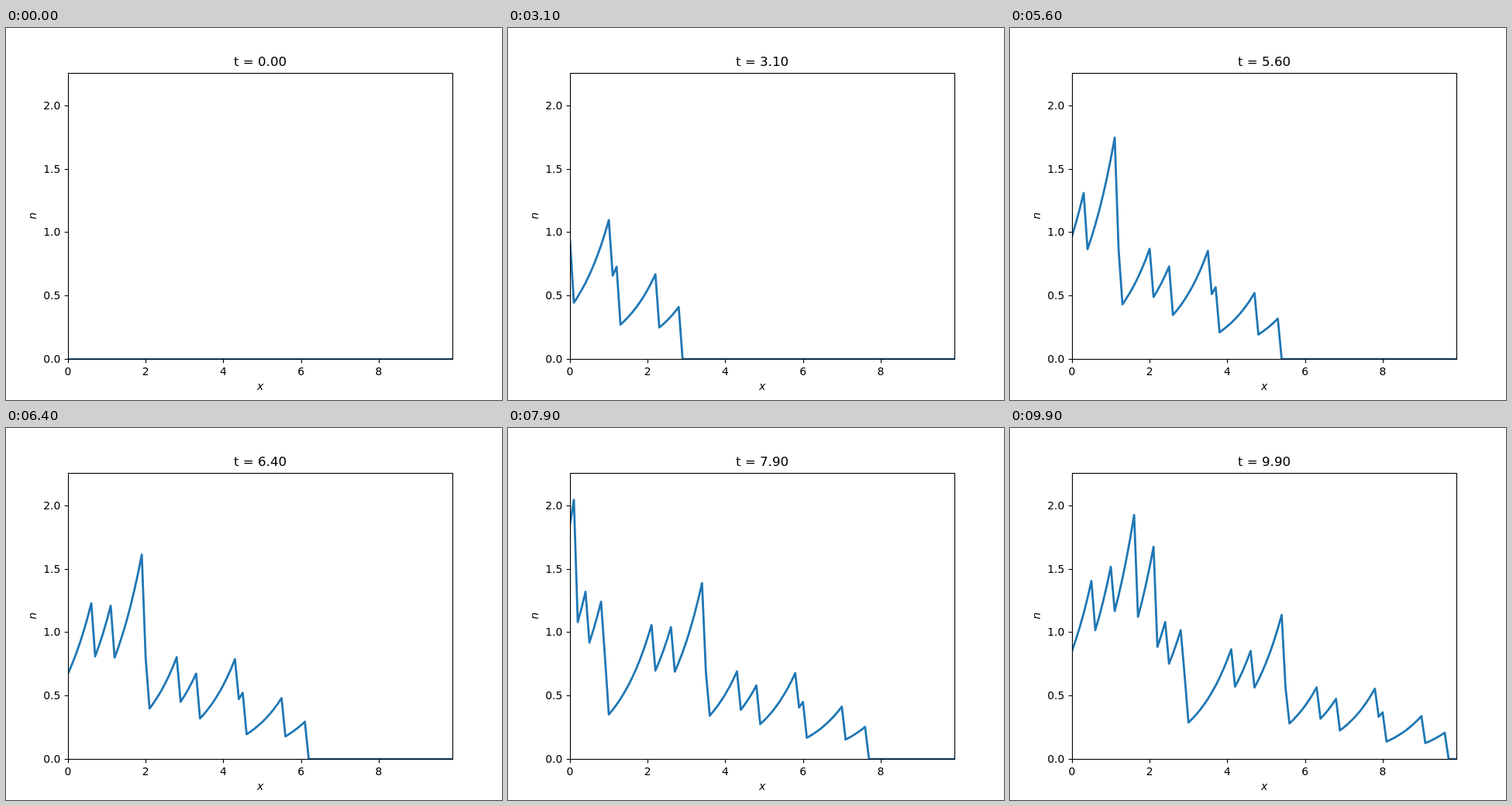
Animation of 640 by 480 pixels, one loop 10000 ms. Source, as an HTML page with a canvas:

```html
<!DOCTYPE html>
<html lang="en">
<head>
<meta charset="utf-8">
<title>Travelling pulses</title>
<style>
  html, body { margin: 0; width: 100%; height: 100%; overflow: hidden; background: #fff; }
  canvas { display: block; }
</style>
</head>
<body>
<canvas id="plot" width="640" height="480"></canvas>
<script>
const ctx = document.getElementById('plot').getContext('2d');
const LEFT = 80, RIGHT = 576, TOP = 57.6, BOTTOM = 427.2;
const STEPS = 100, STEP_MS = 100;
const X_UNIT = (RIGHT - LEFT) / 9.9, Y_UNIT = (BOTTOM - TOP) / 2.2565;

// Density injected at x = 0, by time step
const pulses = {
  3: .5425, 9: .552, 19: .5425, 21: .552, 31: .534, 36: .521, 44: .533, 45: 1.076,
  53: .5405, 58: .525, 70: .535, 71: .552, 75: .507, 78: 1.077, 83: 1.066, 89: .508, 94: .509
};

// Density at the inlet: decays at rate 1.1 between pulses
const inlet = [0];
for (let k = 1; k < STEPS; k++) inlet[k] = inlet[k - 1] * Math.exp(-.11) + (pulses[k] || 0);

// The inlet signal travels right at speed 1 and fades at rate 0.1
const density = (i, k) => i <= k ? inlet[k - i] * Math.exp(-.01 * i) : 0;

const snap = v => Math.floor(v + .5) + .5;

function text(str, x, y, align = 'center', size = 13.889, style = '') {
  ctx.font = `${style} ${size}px "DejaVu Sans", sans-serif`;
  ctx.textAlign = align;
  ctx.fillText(str, x, y);
}

function segment(x1, y1, x2, y2) {
  ctx.beginPath();
  ctx.moveTo(x1, y1);
  ctx.lineTo(x2, y2);
  ctx.stroke();
}

function drawCurve(k) {
  const flat = k < 3;
  const base = flat ? snap(BOTTOM) : BOTTOM;
  ctx.save();
  ctx.beginPath();
  ctx.rect(LEFT, 58, RIGHT - LEFT, 370);
  ctx.clip();
  ctx.beginPath();
  for (let i = 0; i < STEPS; i++) ctx.lineTo(LEFT + i * .1 * X_UNIT, base - density(i, k) * Y_UNIT);
  ctx.strokeStyle = '#1f77b4';
  ctx.lineWidth = flat ? 3 : 2.778;
  ctx.lineJoin = 'round';
  ctx.lineCap = 'square';
  ctx.stroke();
  ctx.restore();
}

function drawAxes() {
  ctx.strokeStyle = ctx.fillStyle = '#000';
  ctx.lineWidth = 1.111;
  const x0 = snap(LEFT), y0 = snap(BOTTOM), y1 = snap(TOP);
  ctx.strokeRect(x0, y1, snap(RIGHT) - x0, y0 - y1);
  for (let v = 0; v <= 8; v += 2) {
    const x = LEFT + v * X_UNIT;
    segment(snap(x), y0, snap(x), y0 + 4.86);
    text(v, x, 448);
  }
  for (let v = 0; v <= 2; v += .5) {
    const y = snap(BOTTOM - v * Y_UNIT);
    segment(x0, y, x0 - 4.86, y);
    text(v.toFixed(1), 70.3, Math.floor(y) + 5, 'right');
  }
  text('x', 328, 467, 'center', 13.889, 'italic');
  ctx.save();
  ctx.translate(39, 242.4);
  ctx.rotate(-Math.PI / 2);
  text('n', 0, 0, 'center', 13.889, 'italic');
  ctx.restore();
}

function draw() {
  const k = Math.floor(performance.now() / STEP_MS) % STEPS;
  ctx.fillStyle = '#fff';
  ctx.fillRect(0, 0, 640, 480);
  drawCurve(k);
  drawAxes();
  text(`t = ${(k / 10).toFixed(2)}`, 328, 49, 'center', 16.667);
  requestAnimationFrame(draw);
}
draw();
</script>
</body>
</html>
```
